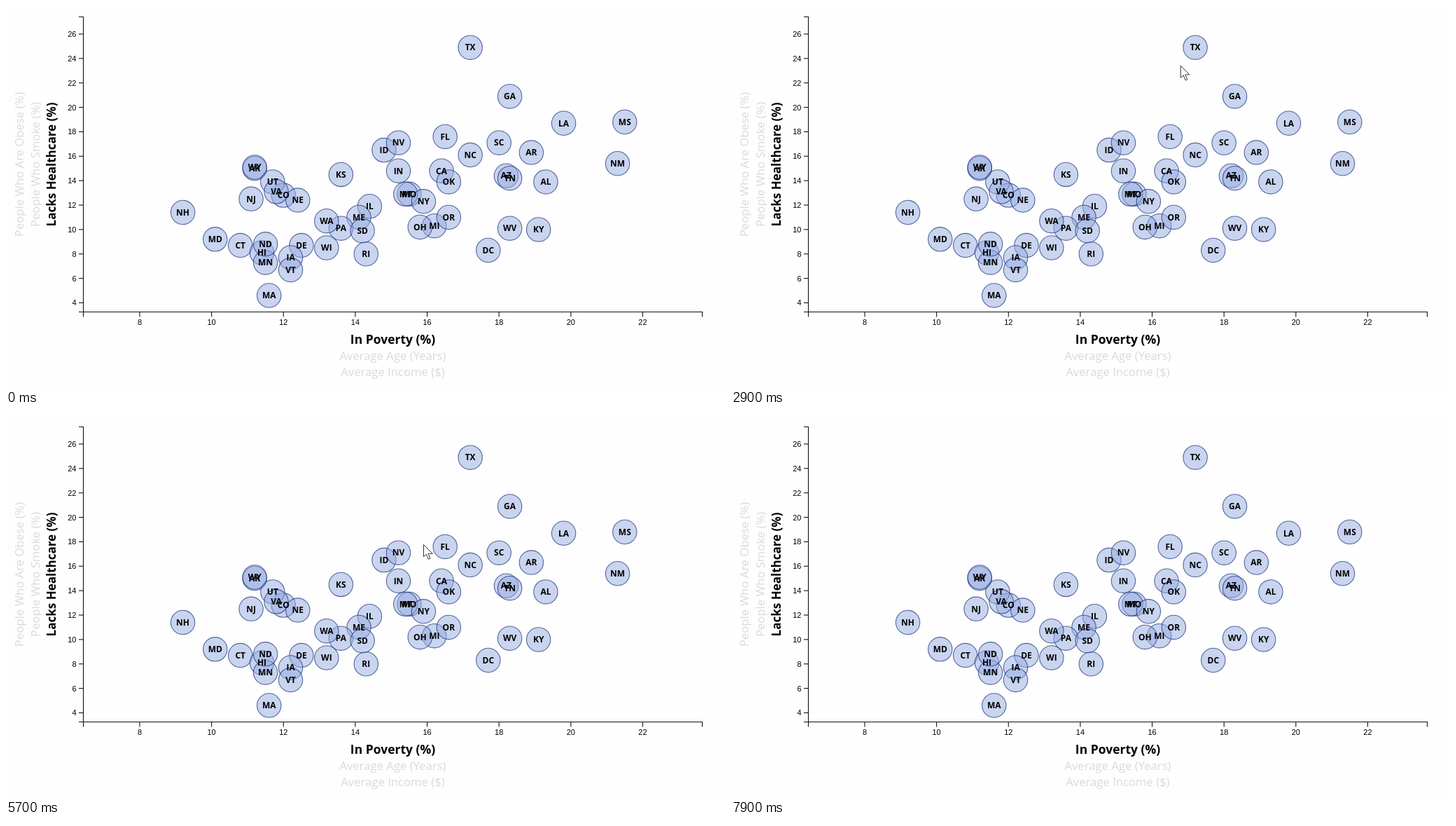
An HTML page that plays this animation: 1027 by 545 pixels, repeating every 8700 ms.

```html
<!DOCTYPE html>
<html lang="en">
<head>
<meta charset="utf-8">
<title>Poverty and healthcare by state</title>
<style>
  html, body { margin: 0; width: 100%; height: 100%; overflow: hidden; background: #fefefe; }
  svg { display: block; width: 1027px; height: 545px; }
  text { font-family: "Open Sans", "Noto Sans", sans-serif; text-anchor: middle; }
  .axis { fill: none; stroke: #111; stroke-width: 1.1; }
  .tick { font: 11px "Liberation Sans", Arial, sans-serif; fill: #000; }
  .tick.left { text-anchor: end; }
  .active { font-weight: 700; fill: #000; }
  .inactive { font-size: 16.7px; fill: #dadada; }
  #circles { fill: rgba(149, 171, 225, .5); stroke: rgba(10, 35, 110, .65); stroke-width: 1.1; }
  #codes { font-size: 12px; font-weight: 700; fill: #000; }
  #tip rect { fill: #001a66; }
  #tip text { font-size: 12px; fill: #fff; }
  #tip #tipName { font-size: 11.6px; font-weight: 700; }
  #cursor { fill: #fff; stroke: #333; stroke-width: 1; stroke-linejoin: round; }
</style>
</head>
<body>
<svg viewBox="0 0 1027 545">
  <g id="axes">
    <path class="axis" d="M104 15.5H110.5V436.5H104M110.5 443.5V436.5H994.5V443.5"/>
  </g>
  <text class="active" font-size="17.5" x="552.5" y="482">In Poverty (%)</text>
  <text class="inactive" x="552.5" y="505">Average Age (Years)</text>
  <text class="inactive" x="552.5" y="528">Average Income ($)</text>
  <g transform="translate(0 226) rotate(-90)">
    <text class="active" font-size="17" y="71">Lacks Healthcare (%)</text>
    <text class="inactive" y="48">People Who Smoke (%)</text>
    <text class="inactive" y="25">People Who Are Obese (%)</text>
  </g>
  <g id="circles"></g>
  <g id="codes"></g>
  <g id="tip">
    <rect width="118.3" height="49.2" rx="4"/>
    <text id="tipName" x="59" y="20.2"></text>
    <text id="tipValue" x="59" y="39.2"></text>
  </g>
  <path id="cursor" d="M.5 .5V17.8L4.4 14.2L7.4 21.3L10 20.2L7.1 13.3H13.2Z"/>
</svg>
<script>
const LOOP = 8700, STEP = 100;

// The plotted survey: [poverty %, without healthcare %]
const states = {
  AL: [19.3, 13.9], AK: [11.2, 15], AZ: [18.2, 14.4], AR: [18.9, 16.3], CA: [16.4, 14.8],
  CO: [12, 12.8], CT: [10.8, 8.7], DE: [12.5, 8.7], DC: [17.7, 8.3], FL: [16.5, 17.6],
  GA: [18.3, 20.9], HI: [11.4, 8.1], ID: [14.8, 16.5], IL: [14.4, 11.9], IN: [15.2, 14.8],
  IA: [12.2, 7.7], KS: [13.6, 14.5], KY: [19.1, 10], LA: [19.8, 18.7], ME: [14.1, 11],
  MD: [10.1, 9.2], MA: [11.6, 4.6], MI: [16.2, 10.3], MN: [11.5, 7.3], MS: [21.5, 18.8],
  MO: [15.5, 12.9], MT: [15.4, 12.9], NE: [12.4, 12.4], NV: [15.2, 17.1], NH: [9.2, 11.4],
  NJ: [11.1, 12.5], NM: [21.3, 15.4], NY: [15.9, 12.3], NC: [17.2, 16.1], ND: [11.5, 8.8],
  OH: [15.8, 10.2], OK: [16.6, 13.9], OR: [16.6, 11], PA: [13.6, 10.1], RI: [14.3, 8],
  SC: [18, 17.1], SD: [14.2, 9.9], TN: [18.3, 14.2], TX: [17.2, 24.9], UT: [11.7, 13.9],
  VT: [12.2, 6.7], VA: [11.8, 13.1], WA: [13.2, 10.7], WV: [18.3, 10.1], WI: [13.2, 8.5],
  WY: [11.2, 15.1]
};

// Eased cursor moves; the cursor rests in between and leaves with the last one.
const entry = [40, -4];
const moves = [
  { from: 200, to: 1100, end: [605, 90] },
  { from: 1200, to: 2000, end: [656, 73] },
  { from: 2800, to: 3000, end: [634, 91] },
  { from: 3100, to: 4100, end: [574, 193] },
  { from: 4200, to: 4300, end: [574, 195] },
  { from: 5300, to: 5400, end: [575, 192] },
  { from: 5500, to: 5700, end: [596, 183] },
  { from: 5700, to: 6100, end: [617, 184] },
  { from: 7000, to: 7100, end: [611, 176.5] },
  { from: 7100, to: 7300, end: [402, 44] },
  { from: 7400, to: 7900, end: [137, -4] }
];

const hovers = [
  { from: 1900, to: 2900, code: "TX", name: "Texas" },
  { from: 4100, to: 5600, code: "NV", name: "Nevada" },
  { from: 5900, to: 7200, code: "FL", name: "Florida" }
];

const $ = id => document.getElementById(id);
const scaleX = v => 191 + (v - 8) * 51.32;
const scaleY = v => 40 + (26 - v) * 17.43;
const easeOut = k => 1 - (1 - k) ** 1.5;

function add(parent, tag, attrs, content = "") {
  const node = document.createElementNS("http://www.w3.org/2000/svg", tag);
  for (const key in attrs) node.setAttribute(key, attrs[key]);
  node.textContent = content;
  parent.appendChild(node);
}

function drawChart() {
  for (let v = 8; v <= 22; v += 2) {
    add($("axes"), "path", { class: "axis", d: `M${scaleX(v)} 436.5v7` });
    add($("axes"), "text", { class: "tick", x: scaleX(v), y: 455 }, v);
  }
  for (let v = 4; v <= 26; v += 2) {
    add($("axes"), "path", { class: "axis", d: `M110.5 ${scaleY(v)}h-6.5` });
    add($("axes"), "text", { class: "tick left", x: 100.5, y: scaleY(v) + 4 }, v);
  }
  for (const [code, [poverty, uninsured]] of Object.entries(states)) {
    const x = scaleX(poverty), y = scaleY(uninsured);
    add($("circles"), "circle", { cx: x, cy: y, r: 17.2 });
    add($("codes"), "text", { x, y: y + 4.3 }, code);
  }
}

function cursorAt(t) {
  if (t < moves[0].from || t >= moves.at(-1).to) return null;
  let [x, y] = entry;
  for (const { from, to, end } of moves) {
    if (t < from) break;
    const k = easeOut(Math.min(1, (t - from) / (to - from)));
    x += (end[0] - x) * k;
    y += (end[1] - y) * k;
  }
  return [x, y];
}

function place(node, position) {
  node.style.display = position ? "" : "none";
  if (position) node.setAttribute("transform", `translate(${position})`);
}

function render(now) {
  const t = Math.floor(now % LOOP / STEP) * STEP;
  place($("cursor"), cursorAt(t));

  const hover = hovers.find(h => t >= h.from && t < h.to);
  if (!hover) return place($("tip"), null);
  const [poverty, uninsured] = states[hover.code];
  $("tipName").textContent = hover.name;
  $("tipValue").textContent = `In Poverty (%): ${poverty}`;
  place($("tip"), [scaleX(poverty) + 14.7, scaleY(uninsured) + 7.3]);
}

drawChart();
const start = performance.now();
function loop() {
  render(performance.now() - start);
  requestAnimationFrame(loop);
}
loop();
</script>
</body>
</html>
```
